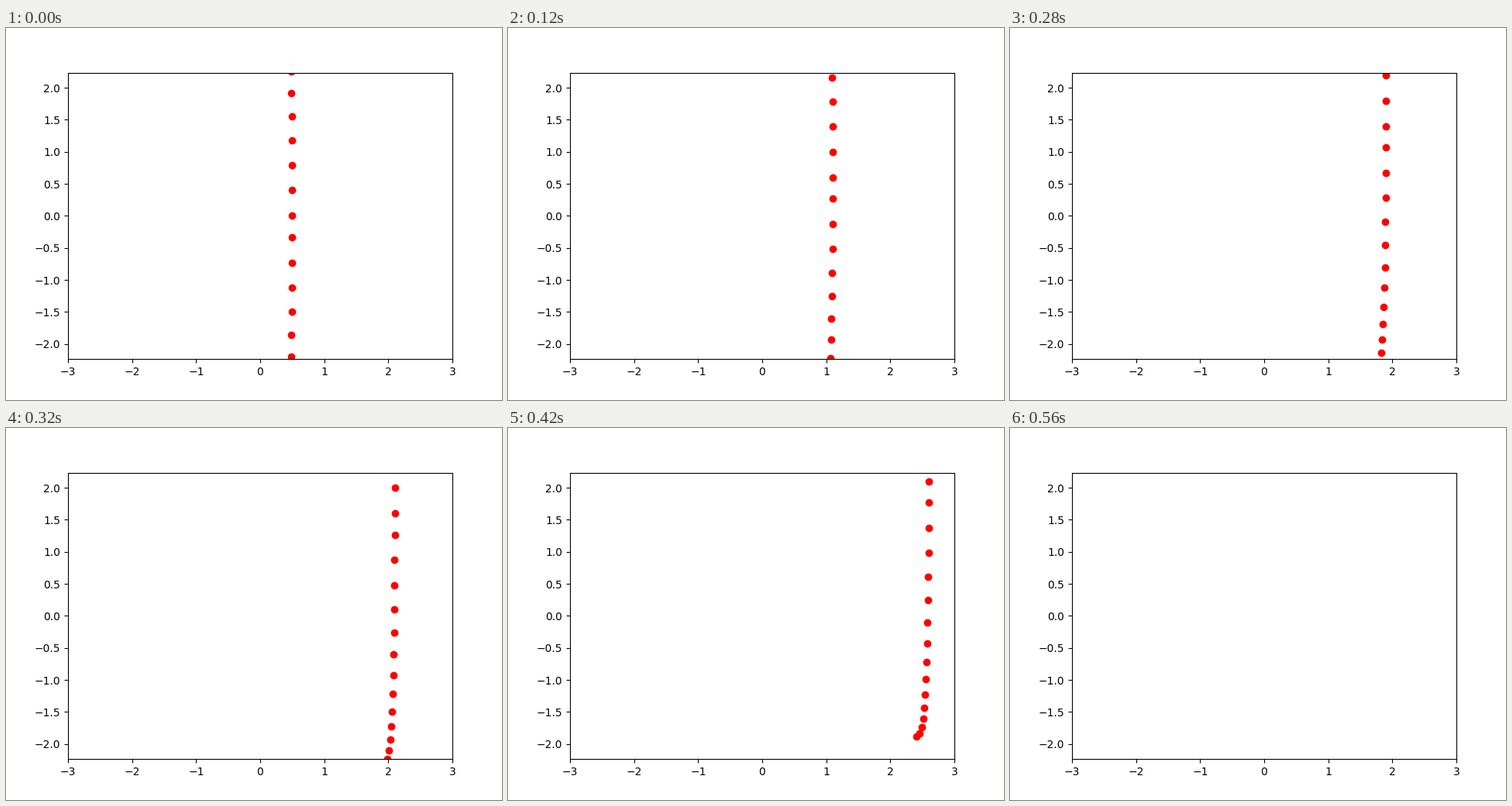
A matplotlib script for the animation above (2.64 s loop, 640 by 480 pixels).

```python
import numpy as np
import matplotlib.pyplot as plt
from matplotlib.animation import FuncAnimation

FRAMES = 132
INTERVAL = 20
STEP = 0.1  # drift along both axes per frame

fig, ax = plt.subplots(figsize=(6.4, 4.8), dpi=100)
ax.set_xlim(-3, 3)
half_height = 3 * 369.6 / 496  # equal scale on both axes
ax.set_ylim(-half_height, half_height)

# Right half of a flattened oval, sampled at even angles
t = np.arange(0, 2 * np.pi, 0.1)
t = t[np.cos(t) > 0]
x = 0.5 * np.cos(t) ** 0.2
y = 4 * np.sin(t)
dots, = ax.plot(x, y, "ro")


def update(i):
    dots.set_data(x + STEP * i, y + STEP * i)
    return dots,


anim = FuncAnimation(fig, update, frames=FRAMES, interval=INTERVAL,
                     repeat=True, repeat_delay=0)
plt.show()
```
